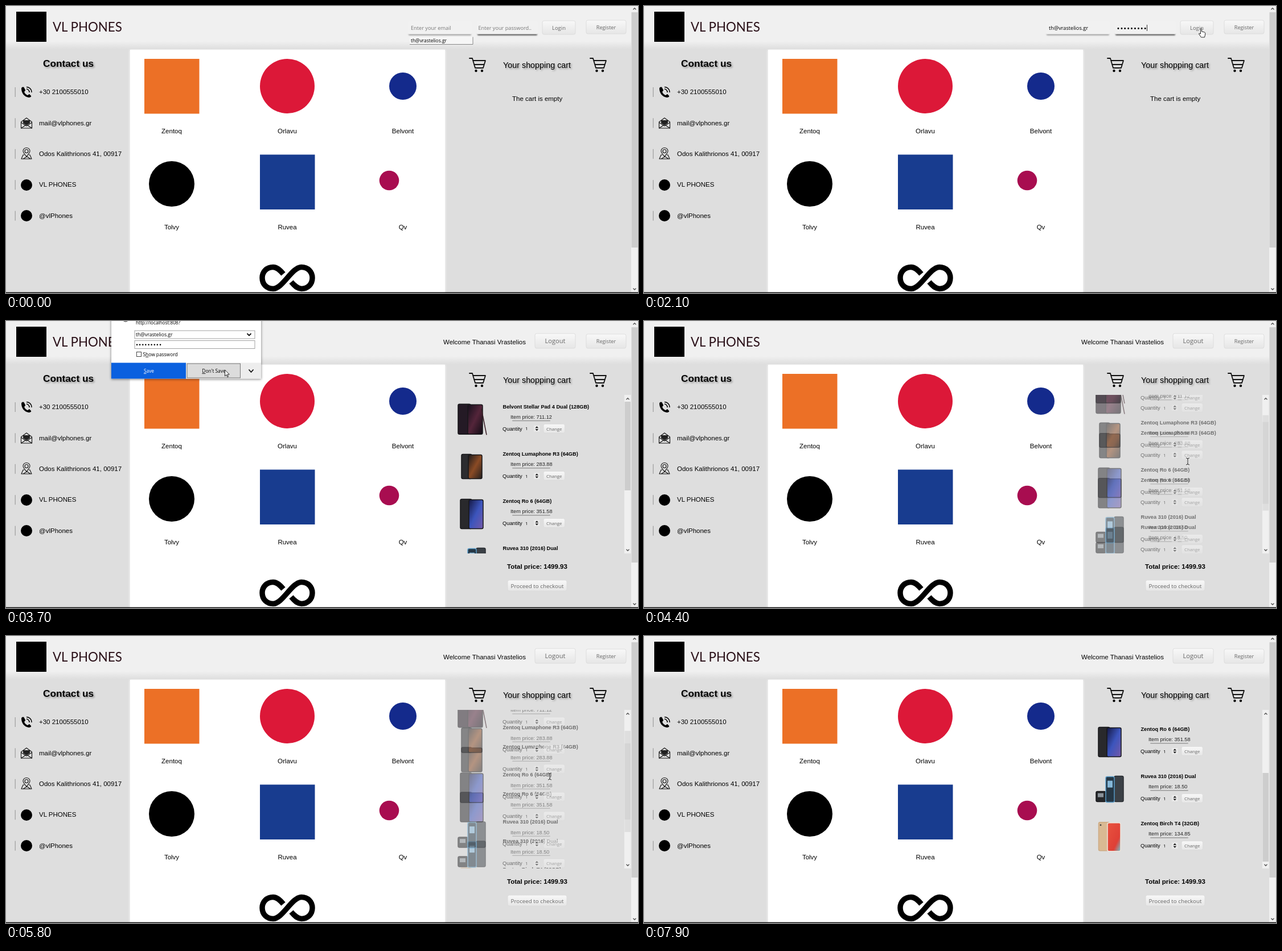
These frames come from a looping animation (1110x505 px, 8 s). An HTML page:

```html
<!DOCTYPE html>
<html lang="en">
<head>
<meta charset="utf-8">
<title>Phone shop login</title>
<style>
html, body { margin: 0; width: 100%; height: 100%; overflow: hidden; background: #dedede; }
svg { display: block; width: 1110px; height: 505px; }
text { font-family: "Liberation Sans", Arial, sans-serif; white-space: pre; }
.ui { font-family: "Open Sans", "Noto Sans", sans-serif; }
.dots { font-family: "DejaVu Sans", sans-serif; }
.title { font-family: Lato, sans-serif; }
.bold { font-weight: bold; }
.mid { text-anchor: middle; }
.lift { filter: drop-shadow(2px 2.5px 1.5px #0005); }
.line { fill: none; stroke: #111; stroke-width: 1.8; stroke-linejoin: round; stroke-linecap: round; }
</style>
</head>
<body>
<svg id="stage" viewBox="0 0 1110 505">
  <defs>
    <linearGradient id="head" x2="0" y2="1"><stop stop-color="#f0f0f0"/><stop offset="1" stop-color="#dedede"/></linearGradient>
    <linearGradient id="button" x2="0" y2="1"><stop stop-color="#f8f8f8"/><stop offset="1" stop-color="#e6e6e6"/></linearGradient>
    <linearGradient id="rose" x2="1" y2="1"><stop stop-color="#15101c"/><stop offset=".5" stop-color="#54253a"/><stop offset="1" stop-color="#100c14"/></linearGradient>
    <linearGradient id="amber" x2="1" y2="1"><stop stop-color="#1b1a1c"/><stop offset=".5" stop-color="#8b4b25"/><stop offset="1" stop-color="#231f1e"/></linearGradient>
    <linearGradient id="violet" x2="1" y2="1"><stop stop-color="#141742"/><stop offset=".5" stop-color="#3c55bd"/><stop offset="1" stop-color="#7459a8"/></linearGradient>
    <linearGradient id="coral" x2="1" y2="1"><stop stop-color="#e8523f"/><stop offset=".7" stop-color="#df4036"/><stop offset="1" stop-color="#70c6d2"/></linearGradient>
    <clipPath id="view"><rect x="784" y="130" width="314" height="279"/></clipPath>
  </defs>
</svg>
<script>
const stage = document.getElementById("stage");
const EMAIL = "th@vrastelios.gr";

const rect = (x, y, w, h, fill, extra = "") =>
  `<rect x="${x}" y="${y}" width="${w}" height="${h}" fill="${fill}" ${extra}/>`;
const circle = (x, y, r, fill = "#000") => `<circle cx="${x}" cy="${y}" r="${r}" fill="${fill}"/>`;
const path = (x, y, d, extra = 'class="line"') => `<path transform="translate(${x} ${y})" d="${d}" ${extra}/>`;
// y is the middle of the capitals
const text = (x, y, s, size = 11.5, cls = "", fill = "#000") =>
  `<text x="${x}" y="${y + size * .36}" font-size="${size}" class="${cls}" fill="${fill}">${s}</text>`;
const button = (x, y, w, h, label, size) =>
  rect(x, y, w, h, "url(#button)", 'rx="3" stroke="#d9d9d9" stroke-width=".8"') +
  text(x + w / 2, y + h / 2 + .5, label, size, "ui mid", "#666");
const group = (id, body, extra = "") => `<g id="${id}" ${extra}>${body}</g>`;
const chevron = (x, y, dir) =>
  path(x, y, `M-2.5 ${dir}L0 ${-dir}L2.5 ${dir}`, 'fill="none" stroke="#505050" stroke-width="1.3"');
const phone = (x, y, w, h, fill, edge = "#17171a") =>
  rect(x, y, w, h, fill, `rx="2.5" stroke="${edge}" stroke-width="1.5"`);

// Page frame
function page() {
  const header = rect(0, 0, 1098, 62, "#f0f0f0") + rect(0, 62, 1098, 14, "url(#head)") +
    rect(18, 10, 53, 53, "#000") + text(82, 36.5, "VL PHONES", 22.3, "title", "#2a1018");
  const bar = rect(1098, 0, 12, 504, "#f0f0f0") + rect(1098.5, 11, 11, 414, "#cdcdcd") +
    chevron(1104, 5, 1.3) + chevron(1104, 498, -1.3);
  return rect(0, 0, 1110, 505, "#dedede") +
    rect(218, 77, 553, 440, "#fff", 'style="filter:drop-shadow(0 0 2px #fff)"') +
    header + contacts() + brands() + bar;
}

function contacts() {
  const labels = ["+30 2100555010", "mail@vlphones.gr", "Odos Kalithrionos 41, 00917", "VL PHONES", "@vlPhones"];
  const thin = 'fill="none" stroke="#111" stroke-width="1.1" stroke-linejoin="round"';
  const icons = [
    path(36, 151, "M-9-6C-8-9-5-9-4-7L-2-3C-2-1-4-1-4 0C-3 3-1 5 2 6C3 6 4 4 5 4L8 7C9 9 6 10 4 10C-4 9-9 2-9-6Z", 'fill="#000"') +
    path(36, 151, "M0-5A6 6 0 0 1 5 1M0-8.5A9 9 0 0 1 9 1", 'fill="none" stroke="#000" stroke-width="1.6"'),
    path(36, 206, "M-9.5-2L0-9L9.5-2V9H-9.5Z", thin) +
    path(36, 206, "M-6-5H6V0L0 4L-6 0Z", 'fill="#222"') + path(36, 206, "M-9.5-1L0 5L9.5-1M-9.5 9L-2 4M9.5 9L2 4", thin),
    path(36, 260, "M0 5C-4 0-6-2-6-5A6 5.5 0 0 1 6-5C6-2 4 0 0 5ZM-3-4.5A3 3 0 0 1 3-4.5A3 3 0 0 1-3-4.5M-4 2H-6L-9 9H9L6 2H4M-6 9L1 5L7 9", thin),
    circle(36, 315, 10), circle(36, 369, 10)
  ];
  return text(65, 100.5, "Contact us", 17.25, "bold lift") + labels.map((s, i) => {
    const y = 151 + i * 54.4;
    return rect(15.5, y - 8, 1.5, 17, "#aaa") + icons[i] + text(58, y, s);
  }).join("");
}

function brands() {
  const names = ["Zentoq", "Orlavu", "Belvont", "Tolvy", "Ruvea", "Qv"];
  return rect(243, 93, 96.5, 96.5, "#ec7026") + circle(494, 141, 48, "#dc1838") +
    circle(697, 141, 24, "#142a8c") + circle(291, 313, 40) +
    rect(446, 261.5, 96.5, 96.5, "#183c8f") + circle(673, 307, 17.3, "#a80d50") +
    names.map((s, i) => text(291 + i % 3 * 203, 220 + (i > 2) * 169, s, 11.5, "mid")).join("") +
    path(494, 478.5, "M7 7C13 14 18 19 25 19C36 19 44 11 44 0S36-19 25-19C8-19-8 19-25 19C-36 19-44 11-44 0S-36-19-25-19C-18-19-13-14-7-7",
      'fill="none" stroke="#000" stroke-width="9.5"');
}

// Header when signed out
function guest() {
  const field = (id, x, w, body, shade) =>
    rect(x + 1, 48.5, w - 2, 3, shade, 'rx="1.5" style="filter:blur(1px)"') +
    rect(x, 27, w, 22.5, "#f1f1f1", 'rx="2"') + group(id, body);
  const hint = (x, s) => text(x, 39, s, 9.2, "ui", "#777");
  return field("emailHint", 706, 112, hint(711, "Enter your email"), "#999") +
    group("emailText", text(711, 39, EMAIL, 9.2, "ui")) +
    field("passHint", 827, 107, hint(829.5, "Enter your password.."), "#444") +
    text(830, 39.5, "", 10, "dots").replace("<text", '<text id="dots"') +
    rect(882, 33, .8, 11, "#000", 'id="caret"') +
    button(942, 26, 58, 24, "Login", 9.4) + button(1019, 25, 70, 24, "Register", 9.1) +
    group("suggest", rect(709, 54, 111, 13.5, "#f6f6f6") +
      path(709, 67.5, "M0 0H111V-13", 'fill="none" stroke="#888" stroke-width="1"') + text(711, 60.5, EMAIL, 8.4, "ui")) +
    text(889, 162.5, "The cart is empty");
}

// Header and cart when signed in
function member() {
  return text(768, 37, "Welcome Thanasi Vrastelios") +
    button(929, 22, 71, 26, "Logout", 11.1) + button(1019, 23, 70, 25, "Register", 9.1) +
    rect(1086, 130, 11.5, 279, "#f0f0f0") + chevron(1092, 137, 1.3) + chevron(1092, 403, -1.3) +
    `<g clip-path="url(#view)">${layer("A")}${layer("B")}</g>` +
    text(880, 432, "Total price: 1499.93", 11.5, "bold") +
    button(881, 456, 104, 19, "Proceed to checkout", 9.8);
}

function layer(id) {
  const items = [
    ["Belvont Stellar Pad 4 Dual (128GB)", "711.12",
      phone(794, -4, 22, 53, "#241a25") + phone(811, -3, 26, 52, "url(#rose)") + path(839, 10, "M-4-6L5 40", 'stroke="#3a2028" stroke-width="1.6"')],
    ["Zentoq Lumaphone R3 (64GB)", "283.88",
      phone(800, 1, 18, 43, "#2c2c2f") + phone(812, 2, 24, 42, "url(#amber)")],
    ["Zentoq Ro 6 (64GB)", "351.58",
      phone(798, -3, 20, 52, "#29292c") + phone(813, -2, 25, 51, "url(#violet)")],
    ["Ruvea 310 (2016) Dual", "18.50",
      phone(794, 27, 17, 18, "#26282b") + rect(797, 30, 10, 7, "#8a9299") + phone(826, 0, 16, 45, "#3b4046", "#2b2e33") +
      phone(811, 1, 15, 45, "#253745", "#5a9cc8") + rect(814, 8, 9, 12, "#85b7d8")],
    ["Zentoq Birch T4 (32GB)", "134.85",
      phone(798.5, -2, 19, 50, "#d9b993", "#cdab83") + circle(802, 3, 1.4, "#444") + phone(814, -1, 23, 50, "url(#coral)", "#eee4da")]
  ];
  const rows = items.map(([name, price, photo], i) =>
    `<g transform="translate(0 ${150.3 + i * 83.1})">` + photo +
    text(872.5, 0, name, 9.2, "bold") +
    rect(889, 24.5, 67, 1.5, "#999", 'rx="1" style="filter:blur(.6px)"') +
    text(886, 18.3, "Item price: " + price, 9.2, "", "#222") +
    text(872, 39, "Quantity", 9.3) + text(912, 39.3, "1", 8, "ui") +
    rect(927, 33.5, 10.5, 11, "#e9e9e9") + path(932.3, 39, "M-2.8-1L0-4L2.8-1ZM-2.8 1L0 4L2.8 1Z", 'fill="#111"') +
    button(944, 31, 37.5, 16, "Change", 7.8) + "</g>").join("");
  return group("layer" + id, group("rows" + id, rows) + rect(1086.5, 142, 10.5, 156, "#cdcdcd", `id="thumb${id}"`));
}

function dialog() {
  const box = (y, h) => rect(226, y, 211, h, "#fff", 'stroke="#999" stroke-width=".9"');
  return rect(185, -5, 263, 106.5, "#fff", 'style="filter:drop-shadow(0 1px 2px #0008)"') +
    path(210, -4, "M-5 0A5 5 0 0 0 5 0", 'fill="none" stroke="#666" stroke-width="1.3"') +
    text(228, 3, "http://localhost:808?", 8.2, "ui") +
    box(17, 14) + text(228, 24, EMAIL, 8.6, "ui") +
    path(427, 24, "M-3-1.5L0 1.5L3-1.5") +
    box(34.5, 14) + text(227.5, 42, "•".repeat(9), 8.7, "dots") +
    rect(229.5, 54.5, 8, 8, "#fff", 'stroke="#333" stroke-width=".9"') +
    text(240.5, 58.8, "S<tspan text-decoration='underline'>h</tspan>ow password", 8.4, "ui") +
    rect(185, 73.5, 131, 28, "#0a60df") + text(251, 88, "<tspan text-decoration='underline'>S</tspan>ave", 8.4, "ui mid", "#fff") +
    rect(316, 73.5, 132, 28, "#ededed") + rect(318, 75, 93.5, 25, "#dcdcdc", 'stroke="#777" stroke-width="1"') +
    text(365, 88, "<tspan text-decoration='underline'>D</tspan>on't Save", 8.4, "ui mid") +
    path(430.5, 88, "M-3.5-2L0 2L3.5-2");
}

const cart = x => path(x, 91, "M0 1H5L10 18H24L28 5H6.5M8 12H25.5") + circle(x + 11.5, 114, 2.2) + circle(x + 22, 114, 2.2);
const outlined = 'fill="#fff" stroke="#111" stroke-width=".9" stroke-linejoin="round"';
const beam = "M-3-6Q0-6 0-4V4Q0 6-3 6M3-6Q0-6 0-4M0 4Q0 6 3 6";

stage.innerHTML += page() + cart(814) + cart(1026) + text(873, 104, "Your shopping cart", 14.35, "lift") +
  group("guest", guest()) + group("member", member()) + group("dialog", dialog()) +
  group("cursor",
    group("arrow", path(0, 0, "M0 0V11L2.6 8.6L4.4 12.6L6 11.9L4.2 8H7.8Z", outlined)) +
    group("hand", path(0, 0, "M-1 10V1Q0-1 1 1V6L6 7Q8 8 7 12L6 16H0L-4 10Q-4 8-1 10Z", outlined)) +
    group("beam", path(0, 0, beam, 'fill="none" stroke="#fff" stroke-width="2"') +
      path(0, 0, beam, 'fill="none" stroke="#111" stroke-width="1"'))) +
  rect(0, 503.6, 1110, 1.4, "#111");

const el = id => document.getElementById(id);
const show = (id, on) => el(id).style.display = on ? "" : "none";

// Linear interpolation over rows of [time, ...values]
function track(rows, t) {
  const i = rows.findIndex(r => r[0] > t);
  if (i < 0) return rows[rows.length - 1].slice(1);
  if (!i) return rows[0].slice(1);
  const a = rows[i - 1], b = rows[i], k = (t - a[0]) / (b[0] - a[0]);
  return a.slice(1).map((v, j) => v + (b[j + 1] - v) * k);
}

const pointer = [[300, 765, 61], [700, 851, 43], [1800, 851, 43], [2100, 978.5, 39], [2800, 978.5, 39],
  [3100, 908, 42], [3600, 384.5, 86], [3900, 384.5, 86], [4250, 955, 247], [6500, 955, 247], [6900, 930, -20]];
const scroll = [[4250, 0], [4750, 153], [5230, 153], [5570, 0], [5700, 0], [5770, 38.5], [5830, 72.5], [5900, 125], [5970, 153]];

function setLayer(id, offset, opacity) {
  el("layer" + id).style.opacity = opacity;
  el("rows" + id).setAttribute("transform", `translate(0 ${-offset})`);
  el("thumb" + id).setAttribute("y", 142 + offset / 153 * 99);
}

function draw(t) {
  const signedIn = t >= 2400;
  show("guest", !signedIn);
  show("member", signedIn);
  show("suggest", t < 300);
  show("emailHint", t < 300);
  show("emailText", t >= 300);

  const typed = Math.max(0, Math.min(9, (t - 900) / 100));
  show("passHint", !typed);
  show("caret", t >= 900);
  el("caret").setAttribute("x", 829 + typed * 6);
  el("dots").textContent = "•".repeat(typed);

  show("dialog", t >= 2600 && t < 4000);
  el("dialog").style.opacity = t < 3900 ? 1 : .5;

  // Moving rows blend two neighbouring positions
  const [a] = track(scroll, t - 30), [b] = track(scroll, t + 30);
  const moving = a !== b;
  setLayer("A", a, moving ? .5 : 1);
  setLayer("B", b, moving ? .5 : 0);

  const [x, y] = track(pointer, t);
  const kind = t >= 700 && t < 2000 || t >= 4250 && t < 6600 ? "beam" : t >= 2000 && t < 2900 ? "hand" : "arrow";
  for (const k of ["arrow", "hand", "beam"]) show(k, k === kind);
  show("cursor", t >= 100);
  el("cursor").setAttribute("transform", `translate(${x} ${y})`);
}

function tick() {
  draw(Math.floor(performance.now() % 8000 / 100) * 100);
  requestAnimationFrame(tick);
}
tick();
</script>
</body>
</html>
```
